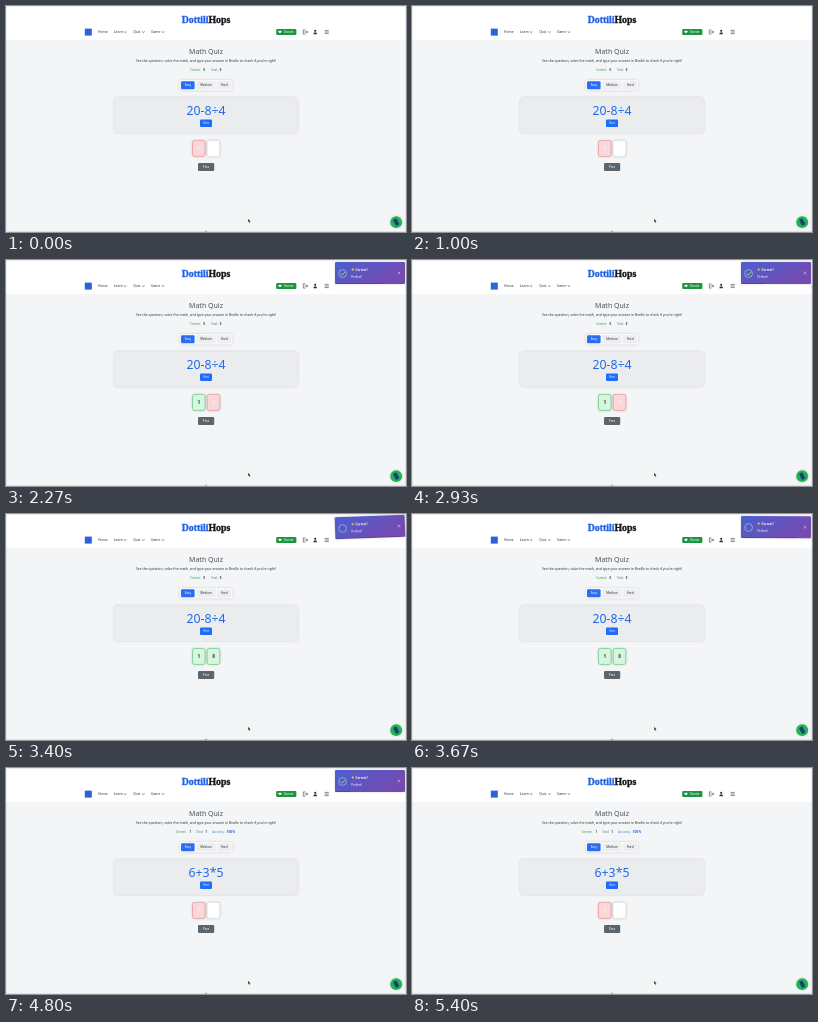
Write an HTML page that moves like this. It is 400 by 226 pixels and loops after 8 s.

```html
<!DOCTYPE html>
<html lang="en">
<head>
<meta charset="utf-8">
<title>Math Quiz</title>
<style>
  html, body { margin: 0; width: 100%; height: 100%; overflow: hidden; background: #f4f5f7; }
  svg { display: block; width: 400px; height: 226px; }
  text { font-family: "Noto Sans", "Open Sans", sans-serif; fill: #33383e; }
  .mid { text-anchor: middle; }
  .brand { font: 900 9.8px "Liberation Serif", serif; stroke-width: .35px; }
  .nav { font-size: 3.4px; font-weight: 500; }
  .small { font-size: 2.8px; }
  .small b, .bold { font-weight: 700; }
  .white { fill: #fff; }
  .sum { font-size: 12.3px; fill: #2168e8; }
  .line { fill: none; stroke: #3b4046; stroke-width: .6; stroke-linecap: round; stroke-linejoin: round; }
  .soft { filter: drop-shadow(0 .8px 1.2px rgba(0, 0, 0, .16)); }
  #toast { transform-origin: 364px 13px; }
  #bar { transform-origin: 329px 24px; }
</style>
</head>
<body>
<svg viewBox="0 0 400 226">
  <defs>
    <linearGradient id="violet" x1="0" y1="0" x2="1" y2=".5">
      <stop offset="0" stop-color="#4c5fd0"/>
      <stop offset="1" stop-color="#744bb0"/>
    </linearGradient>
  </defs>
  <rect width="400" height="226" fill="#f4f5f7"/>

  <!-- header -->
  <rect width="400" height="34" fill="#fff"/>
  <text class="brand mid" x="200" y="16.8"><tspan fill="#2262e6" stroke="#2262e6">Dottili</tspan><tspan fill="#16181d" stroke="#16181d">Hops</tspan></text>
  <rect x="78.8" y="22.6" width="7" height="7" fill="#2b63d9"/>
  <g class="nav">
    <text x="92" y="27.2">Home</text>
    <text x="107.8" y="27.2">Learn</text>
    <text x="127.2" y="27.2">Quiz</text>
    <text x="145" y="27.2">Game</text>
  </g>
  <path class="line" d="M118.2 25.7l1 .9 1-.9M136.4 25.7l1 .9 1-.9M156 25.7l1 .9 1-.9"/>
  <rect x="270.2" y="23" width="20.2" height="6" rx="1" fill="#1b9640"/>
  <path class="white" d="M274 27.3l-1.5-1.4c-.5-.8.8-1.7 1.5-.7.7-1 2-.1 1.500.7z"/>
  <text class="small white" x="277.8" y="27">Donate</text>
  <path class="line" d="M299 23.900h-1.700v4.200h1.700M298.800 26h2.700m-1-1.100 1.100 1.100-1.100 1.100M319 24.400h3.400M319 26h3.400M319 27.600h3.400"/>
  <g fill="#30353b">
    <circle cx="309.2" cy="24.8" r="1.1"/>
    <path d="M307.300 28.300c0-2.700 3.800-2.700 3.800 0z"/>
  </g>

  <!-- heading -->
  <text class="mid" x="200" y="47.500" font-size="7" style="fill:#4a5159">Math Quiz</text>
  <text class="mid" x="200" y="56.200" font-size="3.4">See the question, solve the math, and type your answer in Braille to check if you're right!</text>

  <g id="before">
    <g class="small">
      <text x="184.200" y="65.100" style="fill:#1f9a45">Correct:</text>
      <text class="bold" x="197.600" y="65.100">0</text>
      <text x="204.800" y="65.100" style="fill:#737a81">Total:</text>
      <text class="bold" x="213.800" y="65.100">0</text>
    </g>
  </g>
  <g id="after">
    <g class="small">
      <text x="169.800" y="65.100" style="fill:#1f9a45">Correct:</text>
      <text class="bold" x="183.400" y="65.100">1</text>
      <text x="190.200" y="65.100" style="fill:#737a81">Total:</text>
      <text class="bold" x="199.200" y="65.100">1</text>
      <text x="206.200" y="65.100" style="fill:#3d83e6">Accuracy:</text>
      <text class="bold" x="220.600" y="65.100" font-size="3.3" style="fill:#2168e8">100%</text>
    </g>
  </g>

  <!-- level tabs -->
  <rect class="soft" x="173.500" y="74" width="53" height="10.600" rx="2" fill="#f7f8f9"/>
  <rect x="175" y="75.200" width="13.600" height="8" rx="1.200" fill="#2b6df2"/>
  <rect x="190.600" y="75.200" width="18.800" height="8" rx="1.200" fill="#eceef0"/>
  <rect x="211.200" y="75.200" width="14" height="8" rx="1.200" fill="#eceef0"/>
  <g class="mid" font-size="3">
    <text class="white" x="181.800" y="80.300">Easy</text>
    <text x="200" y="80.300">Medium</text>
    <text x="218.200" y="80.300">Hard</text>
  </g>

  <!-- question -->
  <rect class="soft" x="108" y="91.500" width="184" height="35.500" rx="4" fill="#ebecee"/>
  <text id="sum1" class="sum mid" x="200" y="108.800">20-8÷4</text>
  <text id="sum2" class="sum mid" x="200" y="108.800">6+3*5</text>
  <rect x="194" y="113.400" width="12" height="7.600" rx="1.100" fill="#1f6bfa"/>
  <text class="small white mid" x="200" y="118.200">Hint</text>

  <g id="cells1"></g>
  <g id="cells2"></g>

  <rect x="192" y="157" width="16.200" height="8" rx="1.200" fill="#5b656e"/>
  <text class="white mid" x="200" y="162.100" font-size="3">Pass</text>

  <!-- help button and pointer -->
  <circle class="soft" cx="390.200" cy="216.200" r="5.900" fill="#1fb355"/>
  <rect x="388.400" y="212.800" width="3.700" height="6.800" rx="1" fill="#1c3f73" transform="rotate(-28 390.200 216.200)"/>
  <path d="M242.100 212.800v3.500l.8-.7.6 1.300.6-.3-.6-1.200h1.100z" fill="#111" stroke="#fff" stroke-width=".2"/>

  <g id="toast">
    <rect class="soft" x="329" y="2" width="70" height="22" rx="1.200" fill="url(#violet)"/>
    <rect id="bar" x="329" y="23.200" width="70" height=".8" fill="#000" fill-opacity=".2"/>
    <circle cx="336.600" cy="13.500" r="3.900" fill="none" stroke="#8cc3cf" stroke-width=".8"/>
    <path id="tick" d="M334.700 13.600l1.500 1.500 2.900-3.200" pathLength="1" stroke-dasharray="1 2"
      fill="none" stroke="#a5dc86" stroke-width=".9"/>
    <path d="M346.800 7.800l.5 1.200 1.200.5-1.200.5-.5 1.200-.5-1.200-1.200-.5 1.200-.5z" fill="#ffc247"/>
    <text class="white bold" x="349.600" y="10.600" font-size="3">Correct!</text>
    <text class="white" x="345.200" y="18" font-size="3">Perfect!</text>
    <path class="line" d="M391.900 11.900l2.200 2.200m0-2.200l-2.200 2.200" style="stroke:#d9d5ee;stroke-width:.5"/>
  </g>

  <rect x=".25" y=".25" width="399.500" height="225.500" fill="none" stroke="#000" stroke-opacity=".16" stroke-width=".5"/>
  <path d="M198.800 225.300h2.400" stroke="#777" stroke-width=".6"/>
</svg>
<script>
  const LOOP = 8000, FIRST = 1600, SECOND = 3200, NEXT = 3930;
  const TOAST1 = 1640, TOAST2 = 3240, TOAST_LIFE = 2000;
  const $ = id => document.getElementById(id);

  // steps: [time in ms, properties, easing towards the next step]
  function play(el, steps) {
    const frames = steps.map(([ms, props, easing = 'linear']) => ({ offset: ms / LOOP, easing, ...props }));
    el.animate(frames, { duration: LOOP, iterations: Infinity });
  }

  function show(el, from, to) {
    play(el, [[0, 0], [from, 0], [from, 1], [to, 1], [to, 0], [LOOP, 0]]
      .map(([ms, opacity]) => [ms, { opacity }]));
  }

  const looks = {
    active: { fill: '#fad7d8', edge: '#ee9296', ink: '#fff3f3' },
    right: { fill: '#d6f6df', edge: '#63c982', ink: '#33483a' },
    empty: { fill: '#ffffff', edge: '#dcdfe3', ink: '#ffffff' }
  };

  function addCell(parent, x, look, char, from, to) {
    const { fill, edge, ink } = looks[look];
    const g = document.createElementNS('http://www.w3.org/2000/svg', 'g');
    g.innerHTML = `
      <rect class="soft" x="${x}" y="134.400" width="12.600" height="16" rx="2" fill="${fill}" stroke="${edge}" stroke-width=".7"/>
      <text class="mid" x="${x + 6.3}" y="144" font-size="4.800" font-weight="600" style="fill:${ink}">${char}</text>`;
    parent.append(g);
    show(g, from, to);
  }

  const LEFT = 186.500, RIGHT = 201.200;
  addCell($('cells1'), LEFT, 'active', '?', 0, FIRST);
  addCell($('cells1'), LEFT, 'right', '1', FIRST, NEXT);
  addCell($('cells1'), RIGHT, 'empty', '', 0, FIRST);
  addCell($('cells1'), RIGHT, 'active', '?', FIRST, SECOND);
  addCell($('cells1'), RIGHT, 'right', '8', SECOND, NEXT);
  addCell($('cells2'), LEFT, 'active', '?', NEXT, LOOP);
  addCell($('cells2'), RIGHT, 'empty', '', NEXT, LOOP);

  const shift = y => ({ transform: `translateY(${y}px)` });
  play($('cells2'), [[0, shift(0)], [NEXT, shift(0)], [NEXT, shift(4), 'ease-out'], [NEXT + 400, shift(0)], [LOOP, shift(0)]]);

  for (const id of ['before', 'sum1']) show($(id), 0, NEXT);
  for (const id of ['after', 'sum2']) show($(id), NEXT, LOOP);

  const pose = (y, deg, opacity = 1) => ({ transform: `translateY(${y}px) rotate(${deg}deg)`, opacity });
  const wobble = start => [
    [start, pose(-2.1, 2), 'ease'],
    [start + 165, pose(0, -2), 'ease'],
    [start + 330, pose(1.06, 2), 'ease'],
    [start + 500, pose(0, 0)]
  ];
  const leave = TOAST2 + TOAST_LIFE;
  play($('toast'), [
    [0, pose(0, 0, 0)], [TOAST1, pose(0, 0, 0)],
    ...wobble(TOAST1), [TOAST2, pose(0, 0)],
    ...wobble(TOAST2), [leave, pose(0, 0), 'ease'],
    [leave + 100, pose(0, 1, 0)], [LOOP, pose(0, 1, 0)]
  ]);

  const dash = (strokeDashoffset, opacity) => ({ strokeDashoffset, opacity });
  const draw = start => [
    [start, dash(1, 0)], [start + 400, dash(1, 0)], [start + 400, dash(1, 1), 'ease'], [start + 620, dash(0, 1)]
  ];
  play($('tick'), [[0, dash(1, 0)], ...draw(TOAST1), [TOAST2, dash(0, 1)], ...draw(TOAST2), [LOOP, dash(0, 1)]]);

  const width = k => ({ transform: `scaleX(${k})` });
  play($('bar'), [
    [0, width(1)], [TOAST1, width(1)], [TOAST2, width(1 - (TOAST2 - TOAST1) / TOAST_LIFE)],
    [TOAST2, width(1)], [leave, width(0)], [LOOP, width(0)]
  ]);
</script>
</body>
</html>
```
